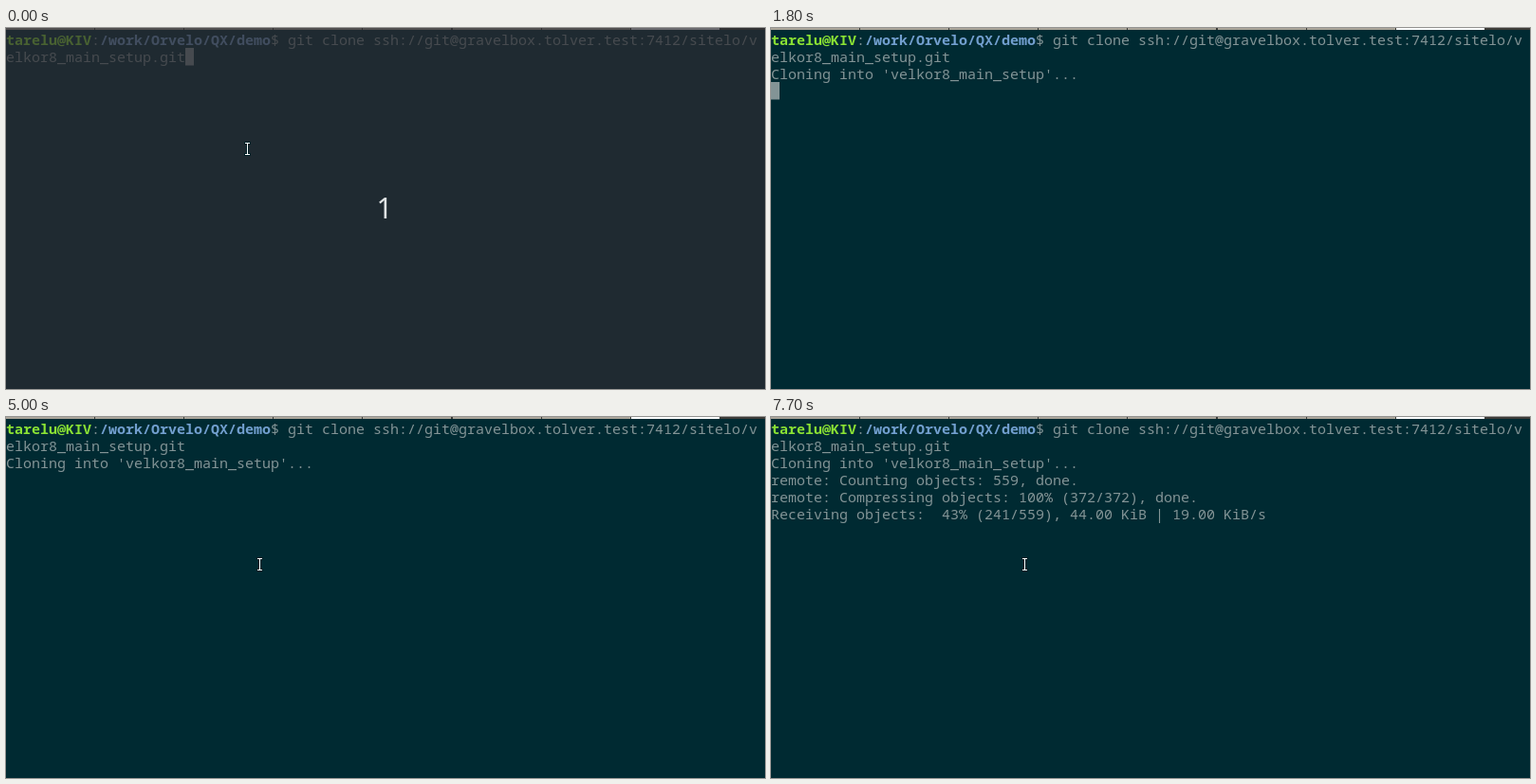
An HTML page with a canvas that plays this animation: 800x381 px, repeating every 8000 ms.

```html
<!DOCTYPE html>
<html lang="en">
<head>
<meta charset="utf-8">
<title>Terminal clone</title>
<style>
  html, body { margin: 0; height: 100%; overflow: hidden; background: #002a32; }
  canvas { display: block; }
</style>
</head>
<body>
<canvas id="stage" width="800" height="381"></canvas>
<script>
const ctx = document.getElementById('stage').getContext('2d');
const LOOP = 8000, CELL = 9, LINE = 18, TOP = 3;
const BG = '#002a32', FG = '#839496', GREEN = '#8ae234', BLUE = '#729fcf';
const MONO = '15px "Noto Sans Mono", "DejaVu Sans Mono", monospace';

// Lines below the command: [time shown, row, text]
const output = [
  [1000, 2, "Cloning into 'velkor8_main_setup'..."],
  [5300, 3, 'remote: Counting objects: 559, done.'],
  [5400, 4, 'remote: Compressing objects: 100% (372/372), done.']
];

// Download progress: [time, objects received, size and speed]
const progress = [
  [5900, 1, ''],
  [6000, 40, ''],
  [6800, 107, ', 12.00 KiB | 9.00 KiB/s'],
  [7100, 157, ', 28.00 KiB | 16.00 KiB/s'],
  [7400, 191, ', 28.00 KiB | 16.00 KiB/s'],
  [7700, 241, ', 44.00 KiB | 19.00 KiB/s']
];

// Block cursor: [on, off, column, row]
const blinks = [
  [0, 200, 21, 1], [600, 1000, 21, 1],
  [1000, 1200, 0, 3], [1800, 2400, 0, 3], [3000, 3600, 0, 3], [4200, 5000, 0, 3],
  [5400, 6000, 0, 5], [6800, 7400, 0, 5]
];

function rect(color, x, y, w, h) {
  ctx.fillStyle = color;
  ctx.fillRect(x, y, w, h);
}

function write(text, col, row, color = FG, bold = false) {
  ctx.font = (bold ? 'bold ' : '') + MONO;
  ctx.fillStyle = color;
  ctx.fillText(text, col * CELL, TOP + row * LINE + 15);
}

function drawTabs() {
  rect('#3c3b37', 0, 0, 800, 2);
  for (let i = 0; i < 8; i++) {
    rect(i === 7 ? '#ffffff' : '#aaa599', Math.round(i * 94.1), 0, 93, 2);
  }
}

function drawCommand() {
  write('tarelu@KIV', 0, 0, GREEN, true);
  write(':', 10, 0);
  write('/work/Orvelo/QX/demo', 11, 0, BLUE, true);
  write('$ git clone ssh://git@gravelbox.tolver.test:7412/sitelo/v', 31, 0);
  write('elkor8_main_setup.git', 0, 1);
}

function drawProgress(t) {
  const step = progress.filter(([start]) => t >= start).pop();
  if (!step) return;
  const [, count, rate] = step;
  const percent = String(Math.floor(count / 559 * 100)).padStart(3);
  write(`Receiving objects: ${percent}% (${count}/559)${rate}`, 0, 5);
}

function drawCursor(t) {
  const blink = blinks.find(([on, off]) => t >= on && t < off);
  if (!blink) return;
  const [, , col, row] = blink;
  rect(FG, col * CELL, TOP + row * LINE, CELL, LINE + 0.5);
  if (row === 5 && t >= 5900) write('R', 0, 5, BG);
}

function drawPointer(t) {
  if (t >= 600 && t < 4400) return;
  const step = t < 600 ? 0 : Math.min(4, Math.floor((t - 4400) / 100));
  const x = 254 + Math.round(step * 13 / 4), y = 127 + step * 7;
  const bars = [[-2, -6, 5, 1], [0, -5, 1, 11], [-2, 6, 5, 1]];
  for (const [dx, dy, w, h] of bars) rect('#002027', x + dx - 1, y + dy - 1, w + 2, h + 2);
  for (const [dx, dy, w, h] of bars) rect('#ffffff', x + dx, y + dy, w, h);
}

function drawCountdown() {
  rect('rgba(45, 43, 49, 0.7)', 0, 0, 800, 381);
  ctx.font = '30px "Noto Sans", "Open Sans", sans-serif';
  ctx.fillStyle = '#dfe3e4';
  ctx.textAlign = 'center';
  ctx.fillText('1', 399, 201);
  ctx.textAlign = 'left';
}

function frame() {
  const t = performance.now() % LOOP;
  rect(BG, 0, 0, 800, 381);
  drawTabs();
  drawCommand();
  for (const [start, row, text] of output) if (t >= start) write(text, 0, row);
  drawProgress(t);
  drawCursor(t);
  if (t < 200) drawCountdown();
  drawPointer(t);
  requestAnimationFrame(frame);
}
frame();
</script>
</body>
</html>
```
